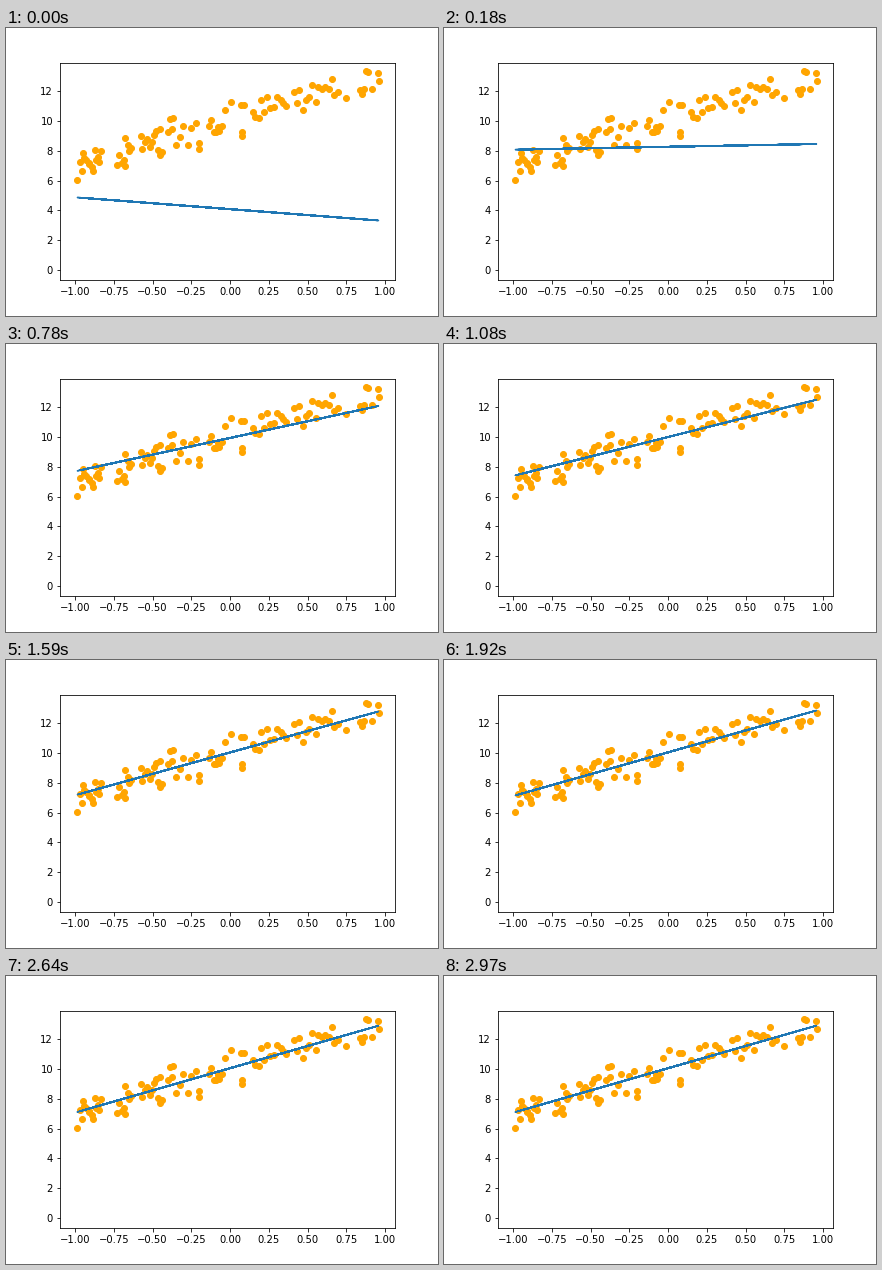
Animation of 432x288 px, one loop 3 s. Source, as a matplotlib script:

```python
import numpy as np
import matplotlib.pyplot as plt
from matplotlib.animation import FuncAnimation

FRAMES, INTERVAL = 100, 30
SLOPE, BIAS = 2.97, 10.02
START = (-0.79, 4.09)
RATE = 0.1
MEAN_X, MEAN_X2 = -0.09, 0.345

# Runs of samples (first x, last x, count) and the points that stand apart
RUNS = [(-0.97, -0.83, 14), (-0.73, -0.635, 8), (-0.575, -0.435, 11),
        (-0.4, -0.22, 8), (-0.14, -0.035, 8), (0.145, 0.36, 12),
        (0.41, 0.695, 15), (0.835, 0.91, 6)]
APART = [(-0.985, 6.05), (-0.675, 6.95), (-0.455, 7.67), (-0.39, 10.1),
         (-0.37, 10.17), (-0.2, 8.53), (-0.2, 8.13), (0.005, 11.25),
         (0.07, 11.05), (0.09, 11.05), (0.075, 9.0), (0.08, 9.23),
         (0.745, 11.5), (0.952, 13.2), (0.958, 12.65)]


def make_samples():
    rng = np.random.default_rng(7)
    x = np.concatenate([np.linspace(*run) for run in RUNS])
    x += rng.uniform(-0.005, 0.005, x.size)
    y = SLOPE * x + BIAS + rng.uniform(-0.85, 0.85, x.size)
    points = np.vstack([np.column_stack([x, y]), APART])
    return rng.permutation(points).T


def descend(w, b):
    """Gradient descent on the mean squared error, one step per frame."""
    path = []
    for _ in range(FRAMES):
        path.append((w, b))
        dw, db = w - SLOPE, b - BIAS
        w -= 2 * RATE * (MEAN_X2 * dw + MEAN_X * db)
        b -= 2 * RATE * (MEAN_X * dw + db)
    return path


x, y = make_samples()
path = descend(*START)

fig = plt.figure(figsize=(6, 4), dpi=72)
fig.subplots_adjust(left=0.125, right=0.9, bottom=0.125, top=0.88)
ax = fig.add_subplot()
ax.scatter(x, y, color="orange")
line, = ax.plot(x, y)
ax.set_xlim(-1.097, 1.063)
ax.set_ylim(-0.635, 13.865)


def update(i):
    w, b = path[i]
    line.set_ydata(w * x + b)
    return line,


anim = FuncAnimation(fig, update, frames=FRAMES, interval=INTERVAL,
                     repeat=True, repeat_delay=0)
plt.show()
```
